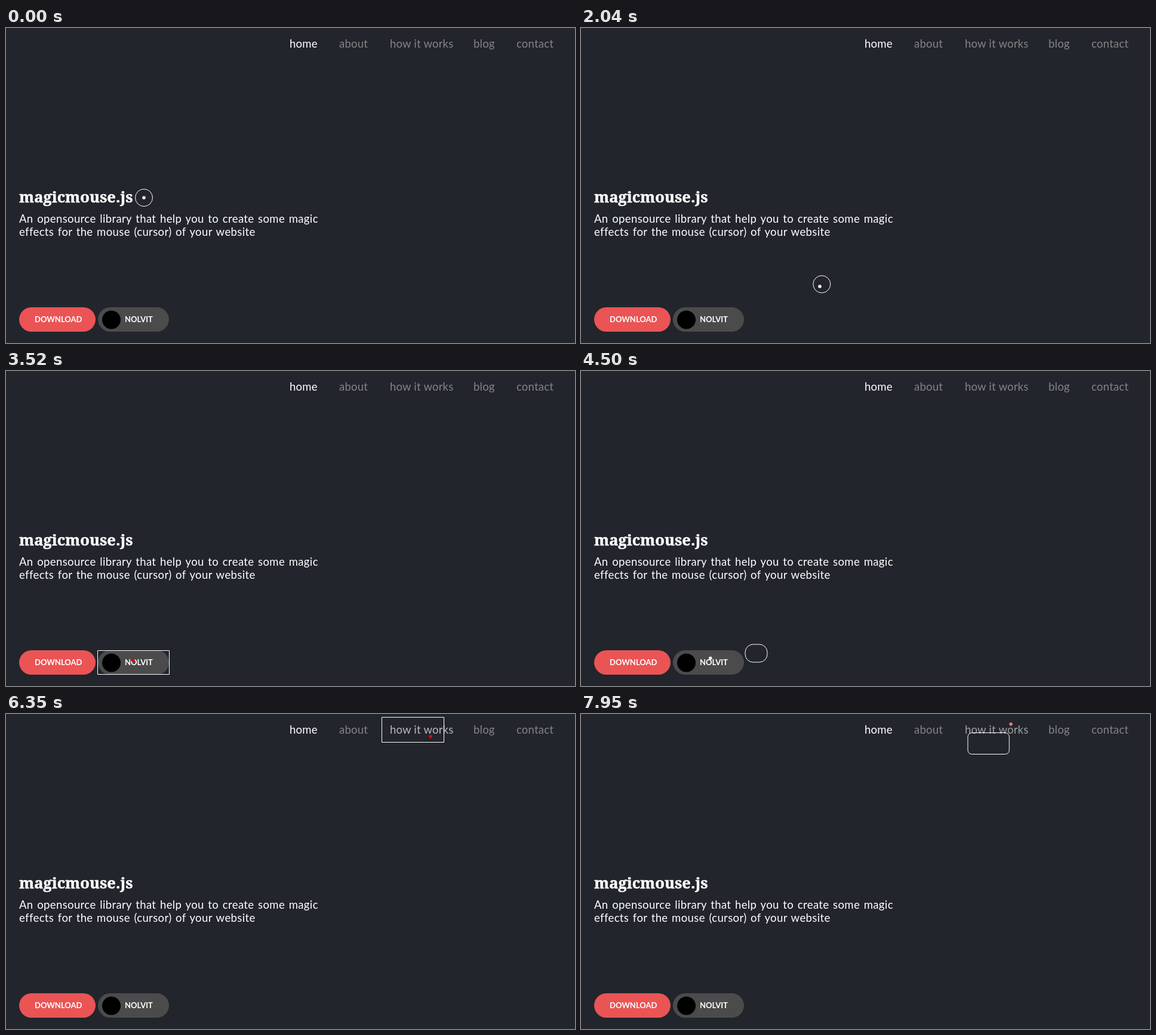
Recreate the animation shown at these times as an HTML page. Size 953x529 px, loop 8000 ms.

```html
<!DOCTYPE html>
<html lang="en">
<head>
<meta charset="utf-8">
<title>magicmouse.js</title>
<style>
  html, body { margin: 0; width: 100%; height: 100%; overflow: hidden; background: #22252c; }
  svg { display: block; width: 953px; height: 529px; font: 18.5px Lato, sans-serif; fill: #fff; }
  .title { font: 900 25.5px "Noto Serif", serif; stroke: #fff; stroke-width: .5px; }
  .intro { letter-spacing: .38px; word-spacing: 1.5px; }
  .nav { letter-spacing: .2px; }
  .label { font-size: 13px; font-weight: 700; }
</style>
</head>
<body>
<svg viewBox="0 0 953 529">
  <g class="nav" id="nav"><text x="475" y="33">home</text></g>
  <text class="title" x="22" y="293">magicmouse.js</text>
  <g class="intro">
    <text x="22" y="327">An opensource library that help you to create some magic</text>
    <text x="22" y="349">effects for the mouse (cursor) of your website</text>
  </g>
  <rect x="22" y="469" width="128" height="41" rx="20.5" fill="#ea5455"/>
  <rect x="154" y="469" width="119" height="41" rx="20.5" fill="#4b4b4b"/>
  <circle cx="176.5" cy="490" r="15.5" fill="#000"/>
  <g class="label">
    <text x="48" y="494">DOWNLOAD</text>
    <text x="199" y="494">NOLVIT</text>
  </g>
  <rect id="ring" fill="none" stroke="#fff"/>
  <circle id="dot" r="2.8"/>
</svg>
<script>
const LOOP = 8000, LAST = 7950, LAG = 160, SAMPLES = 80;

// Each stroke: the time it sets off, then stops of time, x, y. The pointer rests in between.
const strokes = [
  [290, [380, 290, 308], [570, 455, 235], [640, 440, 178], [780, 298, 164]],
  [1280, [1300, 298, 166], [1430, 266, 225], [1720, 492, 330], [1930, 400, 434]],
  [2140, [2230, 420, 436], [2500, 230, 385], [2630, 158, 383], [2710, 134, 405],
    [2788, 102, 466], [2790, 100, 479], [2830, 86, 489]],
  [2970, [3360, 213, 486]],
  [3890, [4120, 405, 463], [4340, 328, 468], [4486, 275, 477], [4500, 217, 482], [4520, 213, 487]],
  [4710, [5000, 430, 350], [5220, 503, 207], [5300, 525, 160], [5380, 535, 138], [5420, 535, 125]],
  [5550, [5650, 535, 137], [6030, 690, 49], [6190, 711, 38]],
  [6395, [6600, 770, 44], [7030, 905, 30]],
  [7210, [7420, 860, 150], [7520, 800, 186], [7790, 672, 105], [7862, 695, 49], [7950, 720, 17]]
];

const nav = document.getElementById("nav");
const ring = document.getElementById("ring");
const dot = document.getElementById("dot");

function set(el, attrs) {
  for (const key in attrs) el.setAttribute(key, attrs[key]);
}

// Hover areas; the ring frames a link slightly to its left
const areas = [["about", 558, 49], ["how it works", 643, 105], ["blog", 783, 36], ["contact", 855, 63]]
  .map(([name, x, w]) => {
    const link = document.createElementNS(nav.namespaceURI, "text");
    link.textContent = name;
    set(link, { x, y: 33 });
    nav.append(link);
    return { link, x, y: 5, w, h: 43, shift: -14 };
  });
areas.push({ x: 22, y: 469, w: 128, h: 41, shift: 0 }, { x: 153, y: 469, w: 121, h: 41, shift: 0 });

function pointer(t) {
  let x = 231, y = 285;
  for (const [start, ...stops] of strokes) {
    let from = start;
    for (const [to, x1, y1] of stops) {
      if (t <= from) return [x, y];
      const k = Math.min(1, (t - from) / (to - from));
      x += (x1 - x) * k;
      y += (y1 - y) * k;
      from = to;
    }
  }
  return [x, y];
}

const mix = (a, b, k) => Math.round(a + (b - a) * k);

function draw(t) {
  // The ring is the mean of its targets over the lag time
  let cx = 0, cy = 0, w = 0, h = 0, hover = 0;
  const share = areas.map(() => 0);
  for (let i = 0; i < SAMPLES; i++) {
    const [x, y] = pointer(t - LAG * (i + .5) / SAMPLES);
    const n = areas.findIndex(a => x >= a.x && x <= a.x + a.w && y >= a.y && y <= a.y + a.h);
    const a = areas[n] || { x: x - 15, y: y - 15, w: 30, h: 30, shift: 0 };
    cx += (a.x + a.shift + a.w / 2) / SAMPLES;
    cy += (a.y + a.h / 2) / SAMPLES;
    w += a.w / SAMPLES;
    h += a.h / SAMPLES;
    if (n >= 0) {
      share[n] += 1 / SAMPLES;
      hover += 1 / SAMPLES;
    }
  }
  set(ring, {
    x: cx - w / 2 + .5, y: cy - h / 2 + .5, width: w - 1, height: h - 1,
    rx: Math.max(0, 14.5 * (1 - hover))
  });

  const [x, y] = pointer(t), tint = mix(255, 0, hover);
  set(dot, { cx: x, cy: y, fill: `rgb(${mix(255, 235, hover)},${tint},${tint})` });

  areas.forEach(({ link }, i) => {
    const v = mix(132, 184, share[i]);
    if (link) set(link, { fill: `rgb(${v},${v},${v})` });
  });
}

function tick() {
  draw(Math.min(performance.now() % LOOP, LAST));
  requestAnimationFrame(tick);
}
tick();
</script>
</body>
</html>
```
